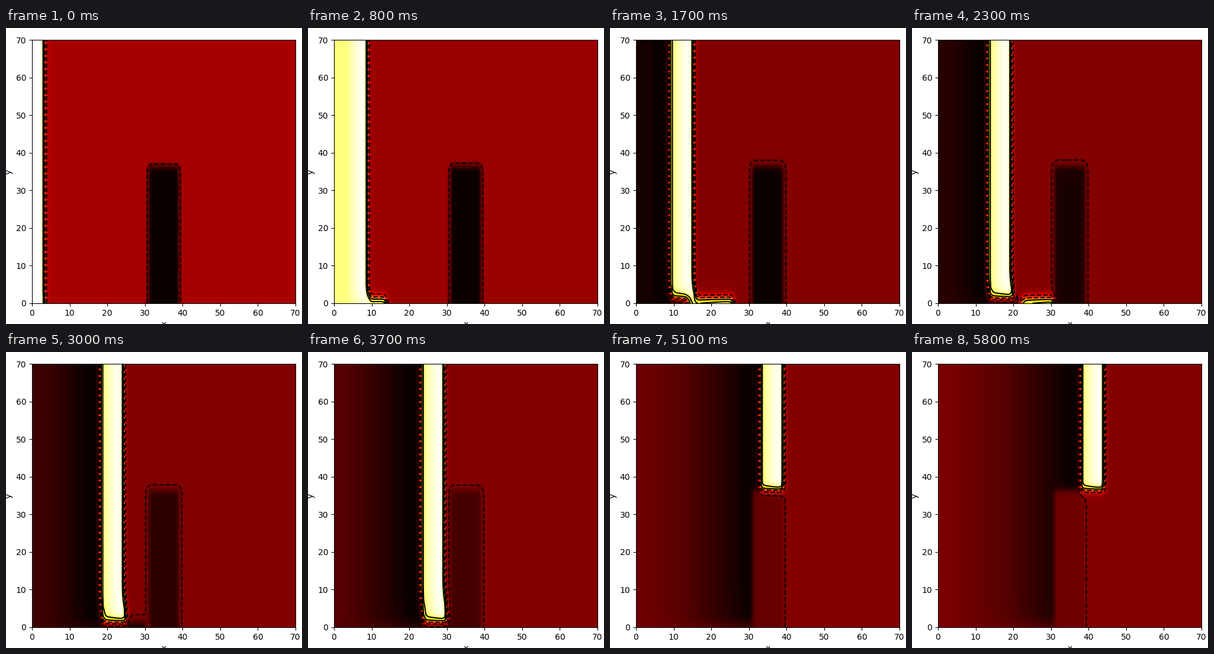
Animation of 500x500 px, one loop 5.9 s. Source, as a matplotlib script:

```python
import numpy as np
import matplotlib.pyplot as plt
from matplotlib.animation import FuncAnimation

FRAMES, INTERVAL = 59, 100
SIZE, STEPS = 70, 100
LEVELS = [0.173, 0.34, 0.5, 0.66, 0.82]
STYLES = ["dashed"] * 3 + ["solid"] * 2
SPEED, EDGE_SPEED = 0.705, 1.33   # units per frame
DURATION = 9.0                    # frames a point stays excited

axis = np.linspace(0, SIZE, STEPS + 1)
X, Y = np.meshgrid(axis, axis)


def sig(z):
    return 1 / (1 + np.exp(-np.clip(z, -50, 50)))


def mix(a, b, w):
    return a + (b - a) * w


def recovery(s):
    """Level of tissue that is still refractory, s frames after excitation."""
    return np.interp(s, [13, 29.65, 36.65, 44.65, 57.65],
                     [0, 0.078, 0.11, 0.1335, 0.165])


def resting(n):
    return np.interp(n, [0, 8, 17, 24], [0.237, 0.216, 0.183, 0.1805])


def wave(n, start, speed):
    """Excitation travelling in +x, with plateau and refractory tail."""
    s = n - np.maximum((X - start) / speed, 0.35)
    plateau = 1 - 0.13 * np.clip((s - 1) / 7, 0, 1) ** 1.4
    front = sig((start + speed * n - X) / 0.24)
    u = mix(resting(n), plateau, front)
    return mix(u, recovery(s), sig((s - DURATION) / 0.3))


# The main front bulges forward near the lower edge.
h = np.clip(Y / (2 + 0.4 * X), 0, 1)
bulge = 0.75 * (1 - np.exp(-X / 9)) * (1 - h * h * (3 - 2 * h))

edge = sig((1.3 - Y) / 0.64)
shadow = sig((X - 30.9) / 0.22) * sig((36.5 - Y) / 0.5)
block = sig((39.1 - X) / 0.22)


def field(n):
    main = wave(n, 3.25 + bulge, SPEED)
    fast = wave(n, 3.3, EDGE_SPEED)
    sheltered = mix(resting(n), recovery(n - 5), block)
    return mix(mix(main, fast, edge), sheltered, shadow)


fig, ax = plt.subplots(figsize=(5, 5), dpi=100)
fig.subplots_adjust(left=0.088, right=0.978, bottom=0.07, top=0.96)
half = SIZE / STEPS / 2
image = ax.imshow(field(0), cmap="hot", vmin=0, vmax=1, origin="lower",
                  interpolation="bilinear", aspect="auto",
                  extent=(-half, SIZE + half, -half, SIZE + half))
ax.set(xlim=(0, SIZE), ylim=(0, SIZE), xlabel="x", ylabel="y")
lines = []


def draw(n):
    u = field(n)
    image.set_data(u)
    while lines:
        lines.pop().remove()
    lines.append(ax.contour(X, Y, u, levels=LEVELS, colors="k",
                            linestyles=STYLES))
    return [image]


anim = FuncAnimation(fig, draw, frames=FRAMES, interval=INTERVAL,
                     init_func=lambda: [image], repeat=True, repeat_delay=0)
plt.show()
```
